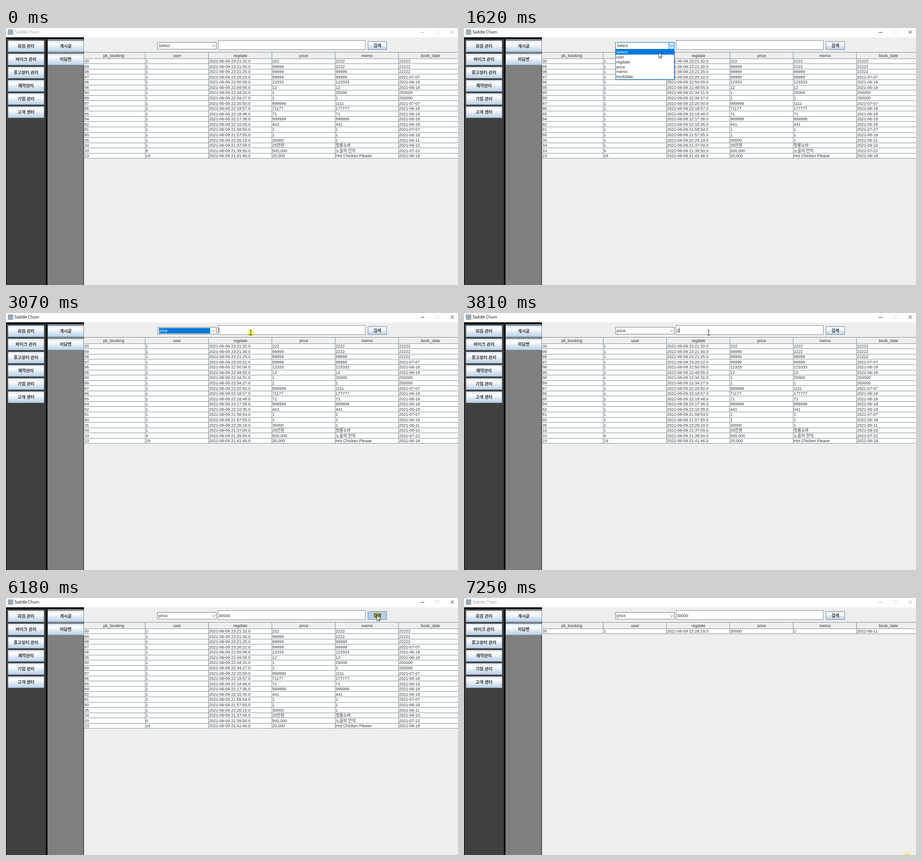
Recreate the animation shown at these times as an HTML page. Size 992 by 565 pixels, loop 7380 ms.

```html
<!DOCTYPE html>
<html lang="ko">
<head>
<meta charset="utf-8">
<title>Booking admin</title>
<style>
  html, body { margin: 0; width: 100%; height: 100%; overflow: hidden; background: #eee; }
  svg { display: block; width: 992px; height: 565px; }
  text { font: 9px 'Liberation Sans', 'Noto Sans CJK KR', 'Noto Sans CJK', sans-serif; fill: #333; white-space: pre; }
  .mid { text-anchor: middle; }
  .bold { font: bold 9.3px 'Noto Sans CJK KR', 'Noto Sans CJK', sans-serif; text-anchor: middle; }
  .title { font: 8.7px 'Open Sans', 'Noto Sans', sans-serif; }
  .halo { mix-blend-mode: multiply; }
</style>
</head>
<body>
<svg id="stage" viewBox="0 0 992 565" xmlns="http://www.w3.org/2000/svg">
  <defs>
    <linearGradient id="ocean" x2="0" y2="1">
      <stop offset="0" stop-color="#dde8f3"/>
      <stop offset=".3" stop-color="#fff"/>
      <stop offset=".6" stop-color="#dde8f3"/>
      <stop offset="1" stop-color="#b8cfe5"/>
    </linearGradient>
  </defs>
  <rect width="992" height="565" fill="#eee"/>
</svg>
<script>
const NS = 'http://www.w3.org/2000/svg';
const stage = document.getElementById('stage');
const LOOP = 7380, LINE = '#7a8a99', BLUE = '#0078d7';
const LEFT = 171, FIRST_ROW = 67.6, ROW = 11.56, COLUMN = 139;
const POPUP_TOP = 47.7, OPTION = 10.84;

function set(node, attrs) {
  for (const key in attrs) node.setAttribute(key, attrs[key]);
  return node;
}
function add(parent, tag, attrs, content) {
  const node = set(document.createElementNS(NS, tag), attrs);
  if (content !== undefined) node.textContent = content;
  return parent.appendChild(node);
}
const rect = (parent, x, y, width, height, fill, stroke = 'none') =>
  add(parent, 'rect', { x, y, width, height, fill, stroke });
const label = (parent, x, y, content, cls = '') =>
  add(parent, 'text', { x, y, class: cls }, content);
const path = (parent, d, stroke, fill = 'none') => add(parent, 'path', { d, stroke, fill });
const group = (parent = stage) => add(parent, 'g', {});
const show = (node, on) => set(node, { visibility: on ? 'visible' : 'hidden' });

function button(x, y, width, height, content) {
  const face = rect(stage, x + .5, y + .5, width - 1, height - 1, 'url(#ocean)', LINE);
  label(stage, x + width / 2, y + height / 2 + 3.3, content, 'bold');
  return face;
}
const menu = (x, names) =>
  names.forEach((name, i) => button(x, Math.round(27 + i * 28.9), 80, 26, name));

// Window frame
rect(stage, 0, 0, 992, 20.5, '#fff');
rect(stage, 4, 3, 12, 12, '#9aabb9');
const title = label(stage, 19, 12.2, 'Saddle Chum', 'title');
const controls = path(stage, 'M910 9.5H918M976 5.5L983 12.5M983 5.5L976 12.5', '#000');
set(controls, { 'stroke-width': .9 });
path(stage, 'M943.5 5.5H950V12H943.5Z', '#ddd');

// Side menus
rect(stage, 0, 20.5, LEFT, 545, '#000');
rect(stage, 1, 24, 86.5, 541, '#404040');
rect(stage, 91, 24, 79, 541, '#808080');
menu(4, ['회원 관리', '바이크 관리', '중고장터 관리', '예약관리', '기업 관리', '고객 센터']);
menu(91, ['게시글', '미답변']);

// Table
path(stage, `M${LEFT} 53.5H992M${LEFT} 67.5H992`, LINE);
['pk_booking', 'user', 'regdate', 'price', 'memo', 'book_date'].forEach((name, i) => {
  label(stage, 236.5 + i * COLUMN, 64, name, 'mid');
  if (i) path(stage, `M${166.5 + i * COLUMN} 53V67`, LINE);
});

const records = `00|1|23:21:32|222|2222|22222
99|1|23:21:30|99999|2222|22222
98|1|23:21:25|99999|99999|22222
97|1|23:20:22|99999|99999|2021-07-07
96|1|22:50:09|12333|123333|2021-06-18
95|1|22:49:55|12|12|2021-06-18
90|1|22:34:31|1|25000|250000
89|1|22:34:27|1|1|250000
87|1|22:20:50|999999|1111|2021-07-07
86|1|22:18:57|71177|177777|2021-06-18
85|1|22:18:48|71|71|2021-06-18
84|1|22:17:36|999999|999999|2021-06-18
82|1|22:10:35|441|441|2021-06-18
81|1|21:58:54|1|1|2021-07-07
80|1|21:57:55|1|1|2021-06-18
35|1|22:26:19|30000|1|2021-06-11
34|1|21:37:09|25만원|청룡쇼바|2021-09-10
33|9|21:39:50|500,000|노을의 언덕|2021-07-22
23|19|21:41:46|20,000|Hot Chicken Please|2021-06-18`.split('\n').map(line => line.split('|'));

function drawRows(rows) {
  const table = group();
  const lineAfter = count => Math.floor(FIRST_ROW + count * ROW - .36) + .5;
  const end = lineAfter(rows.length);
  rect(table, LEFT, 68, 821, end - 68, '#fff');
  rows.forEach((cells, r) => {
    path(table, `M${LEFT} ${lineAfter(r + 1)}H992`, LINE);
    const baseline = Math.round(FIRST_ROW + r * ROW + 8.5);
    cells.forEach((cell, c) => {
      const x = c ? 167.5 + c * COLUMN : 172;
      label(table, x, baseline, c === 2 ? `2021-06-09 ${cell}.0` : cell);
    });
  });
  for (let c = 1; c < 6; c++) path(table, `M${166.5 + c * COLUMN} 68V${end}`, LINE);
  return table;
}
const allRows = drawRows(records);
const foundRows = drawRows(records.filter(cells => cells[3] === '30000'));

// Search bar
const combo = rect(stage, 332.5, 31.5, 129, 15, '#fff');
const comboFocus = rect(stage, 335, 33, 113, 12, BLUE);
const comboText = label(stage, 335, 42, '');
const comboArrowBox = rect(stage, 449.5, 31.5, 12, 15, '#cce4f7', BLUE);
path(stage, 'M452.5 38L455.5 41L458.5 38', '#444');
rect(stage, 465.5, 27.5, 323, 20, '#fff', LINE);
const query = label(stage, 467, 42, '');
const caret = rect(stage, 467, 32, 1, 12, '#333');
const search = button(794, 29, 42, 19, '검색');
const searchGlow = rect(stage, 795.5, 30.5, 39, 16, 'none', '#b8cfe5');

const popup = group();
rect(popup, 337, 51, 126.5, 64, '#000').setAttribute('opacity', .2);
rect(popup, 332.5, 47.5, 129, 65.5, '#fff', BLUE);
const highlight = rect(popup, 333, 0, 128, OPTION, BLUE);
const options = ['Select', 'user', 'regdate', 'price', 'memo', 'bookdate'].map((name, i) =>
  label(popup, 334, POPUP_TOP + i * OPTION + 8.4, name));

// Pointer
const halo = add(stage, 'circle', { r: 7, cy: .7, fill: '#fffa64', class: 'halo' });
const arrow = path(stage, 'M0 0V12L2.9 9.3L4.7 13.4L6.4 12.7L4.6 8.7H8.6Z', '#000', '#fff');
set(arrow, { 'stroke-width': .8 });
const beam = path(stage, 'M-2.5 -5.5H-.8L0 -5L.8 -5.5H2.5M0 -5V5M-2.5 5.5H-.8L0 5L.8 5.5H2.5', '#222');

// Pointer trips: start, end, points passed at even pace
const trips = [
  [310, 1010, [[896, 482], [760, 320], [600, 165], [500, 80], [450, 48], [437, 38]]],
  [1420, 2040, [[437, 38], [430, 50], [420, 62], [400, 74], [390, 82]]],
  [2110, 2510, [[390, 82], [392, 85]]],
  [2640, 3000, [[392, 85], [430, 70], [500, 50], [537, 43]]],
  [5210, 5900, [[506, 49], [494, 63], [560, 56], [660, 25], [740, 12], [795, 28], [814, 38]]],
  [6500, 6780, [[814, 38], [825, 75], [880, 250], [953, 467], [972, 567]]]
];
const presses = [[1280, 1350], [2580, 2640], [3000, 3140], [6180, 6310], [7250, LOOP]];
const keyTimes = [3810, 4070, 4340, 4540, 4810];
const within = (t, from, to) => t >= from && t < to;

function pointerAt(t) {
  const [start, end, points] = trips.filter(trip => trip[0] <= t).pop() || trips[0];
  const place = Math.min(1, Math.max(0, (t - start) / (end - start))) * (points.length - 1);
  const i = Math.min(points.length - 2, Math.floor(place));
  return points[i].map((v, axis) => v + (points[i + 1][axis] - v) * (place - i));
}

function render(t) {
  const [x, y] = pointerAt(t);
  const over = (left, top, right, bottom) => x >= left && x < right && y >= top && y < bottom;
  const pointerOn = t >= 310;
  const active = within(t, 1280, 7250);
  title.style.fill = active ? '#000' : '#999';
  set(controls, { stroke: active ? '#000' : '#999' });

  // Combo box and its popup
  const open = within(t, 1350, 2640), focused = within(t, 2640, 3210);
  const hovered = pointerOn && over(332, 31, 462, 47);
  set(combo, { stroke: open ? BLUE : hovered ? '#222' : '#7a7a7a' });
  comboText.textContent = t < 2640 ? 'Select' : 'price';
  comboText.style.fill = focused ? '#fff' : '#333';
  show(comboFocus, focused);
  show(comboArrowBox, open);
  show(popup, open);
  const chosen = Math.max(0, Math.min(5, Math.floor((y - POPUP_TOP) / OPTION)));
  set(highlight, { y: POPUP_TOP + chosen * OPTION });
  options.forEach((option, i) => { option.style.fill = i === chosen ? '#fff' : '#333'; });

  // Typed query
  const typed = keyTimes.filter(time => time <= t).length;
  query.textContent = '30000'.slice(0, typed);
  set(caret, { x: 467 + typed * 5 });
  show(caret, within(t, 3000, 6180) && !within(t, 3610, 3810) && !within(t, 5350, 5850));

  // Search button and result
  const pressed = within(t, 6180, 6310);
  set(search, { fill: pressed ? '#b8cfe5' : 'url(#ocean)' });
  show(searchGlow, pointerOn && !pressed && over(794, 29, 836, 48));
  show(allRows, t < 6310);
  show(foundRows, t >= 6310);

  const move = { transform: `translate(${x} ${y})` };
  const inField = over(466, 28, 789, 48);
  show(set(arrow, move), pointerOn && !inField);
  show(set(beam, move), pointerOn && inField);
  show(set(halo, move), presses.some(([from, to]) => within(t, from, to)));
}

const began = performance.now();
function tick() {
  render((performance.now() - began) % LOOP);
  requestAnimationFrame(tick);
}
tick();
</script>
</body>
</html>
```
